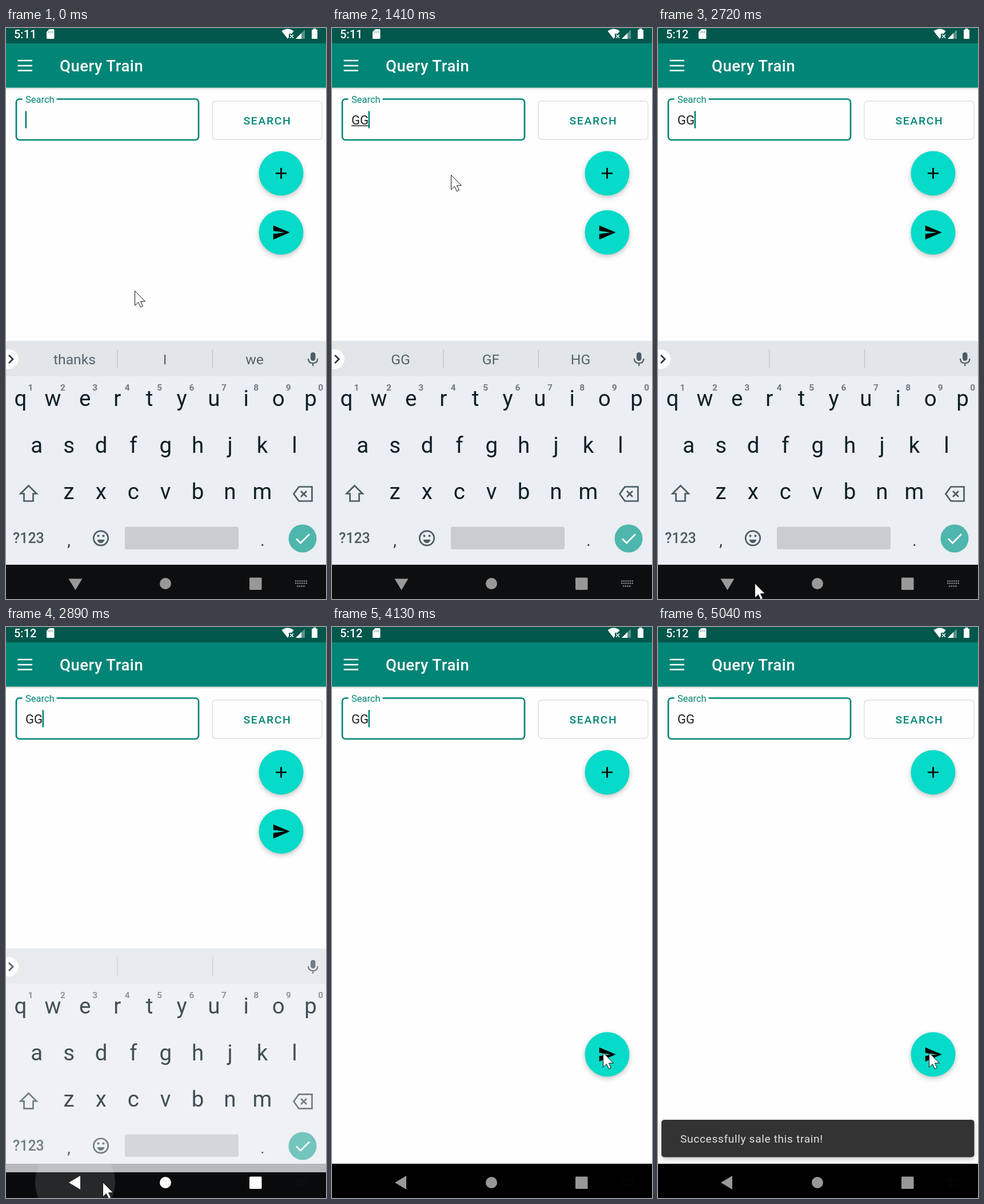
An HTML page that plays this animation: 560x1000 px, repeating every 5.1 s.

```html
<!DOCTYPE html>
<html lang="en">
<head>
<meta charset="utf-8">
<title>Train search</title>
<style>
html, body { margin: 0; width: 100%; height: 100%; overflow: hidden; background: #fefefe; }
svg { display: block; width: 100%; height: 100%; font-family: Roboto, sans-serif; }
.mid { text-anchor: middle; }
.med { font-weight: 500; }
.line { fill: none; stroke: #4a5c64; stroke-width: 2.7; }
.fab { filter: drop-shadow(0 3px 4px rgba(0,0,0,.24)); }
</style>
</head>
<body>
<svg viewBox="0 0 560 1000">
  <defs>
    <clipPath id="navClip"><rect y="940" width="560" height="60"/></clipPath>
    <linearGradient id="fade" x2="0" y2="1">
      <stop offset="0" stop-color="#000" stop-opacity=".16"/>
      <stop offset="1" stop-color="#000" stop-opacity="0"/>
    </linearGradient>
  </defs>
  <rect width="560" height="1000" fill="#fefefe"/>

  <!-- status bar and toolbar -->
  <rect y="104" width="560" height="5" fill="url(#fade)"/>
  <rect y="26" width="560" height="78.5" fill="#018577"/>
  <rect width="560" height="27" fill="#00574b"/>
  <g fill="#fff">
    <text id="clock" class="med" x="14" y="18" font-size="20"></text>
    <path d="M75.5 2H83q1.500 0 1.500 1.500V17.500q0 1.500-1.500 1.500H72.500q-1.500 0-1.500-1.500V7Z"/>
    <path d="M482.500 5.500Q493-2.500 503.500 5.500L500 10H495V16L493 19Z"/>
    <path d="M497 11.500l6 6m0-6l-6 6" stroke="#fff" stroke-width="1.600"/>
    <path d="M523 3V19H507Z" opacity=".35"/>
    <path d="M517 9V19H507Z"/>
    <path d="M535 3h2.500V1h5v2h2.500V19H535Z"/>
    <path d="M20.500 57h25.500m-25.500 9h25.500m-25.500 8.500h25.500" stroke="#fff" stroke-width="2.700"/>
    <text class="med" x="94" y="76" font-size="27.5" letter-spacing=".5">Query Train</text>
  </g>
  <path d="M75 5v4m3-4v4m3-4v4" stroke="#00574b" stroke-width="1" opacity=".6"/>

  <!-- search form -->
  <rect x="18" y="124.500" width="319" height="71.500" rx="5.500" fill="none" stroke="#018577" stroke-width="2.700"/>
  <rect x="28.500" y="121" width="60" height="8" fill="#fefefe"/>
  <text x="34" y="131" font-size="16.5" fill="#018577">Search</text>
  <text id="typed" x="34" y="169" font-size="22" fill="#212121"></text>
  <rect id="under" x="34" y="170.500" height="1.500" fill="#212121"/>
  <rect id="caret" y="145.500" width="2.700" height="30" fill="#018577"/>
  <rect x="361" y="128" width="192" height="67" rx="5.500" fill="#fefefe" stroke="#dfdfdf" stroke-width="1.400"/>
  <text class="med" x="415.500" y="168.700" font-size="19.25" letter-spacing="1.72" fill="#018577">SEARCH</text>

  <!-- action buttons -->
  <circle class="fab" cx="481.500" cy="254.500" r="39" fill="#06dac8"/>
  <path d="M472 254.500h19m-9.500-9.500v19" stroke="#000" stroke-width="2.700"/>
  <g id="send">
    <circle class="fab" r="39" fill="#06dac8"/>
    <circle id="tap" fill="#fff"/>
    <path transform="scale(1.375) translate(-12 -12)" d="M2 21L23 12 2 3V10L17 12 2 14Z"/>
  </g>

  <g id="snack">
    <rect class="fab" x="6" y="863" width="547.500" height="65.500" rx="5" fill="#333"/>
    <text x="39" y="903.300" font-size="19.25" letter-spacing=".6" fill="#e2e2e2">Successfully sale this train!</text>
  </g>

  <rect y="940" width="560" height="60"/>
  <g id="keyboard">
    <rect y="940" width="560" height="75" fill="#0c0e10"/>
    <rect y="548" width="560" height="392" fill="#ebeef2"/>
    <rect y="548" width="560" height="62" fill="#e2e6e9"/>
    <path d="M195 563v33m166.500-33v33" stroke="#c0c6c9" stroke-width="1.400"/>
    <path d="M0 563H5a17 17 0 0 1 0 34H0Z" fill="#fff"/>
    <path class="line" d="M5 573l7 7-7 7" style="stroke:#26363d"/>
    <rect x="533" y="568" width="8.500" height="15" rx="4.200" fill="#4a5c64"/>
    <path class="line" style="stroke-width:2.2" d="M529 579q0 8 8.200 8t8.200-8M537.200 587v5"/>
    <g id="hints" class="mid" font-size="24.75" fill="#54646c"></g>
    <g id="keys" class="mid" font-size="38.5" fill="#0d1f28"></g>
    <g id="digits" class="mid" font-size="15.5" font-weight="700" fill="#717d83"></g>
    <path class="line" d="M39.500 801.500L53.500 815.500H47.500V828.500H31.500V815.500H25.500Z"/>
    <path class="line" d="M512.500 803.500H535.500V828.500H512.500L503.500 816ZM516 811l10 10m0-10l-10 10"/>
    <text class="med" x="12" y="902" font-size="25" fill="#4a5c64">?123</text>
    <g class="mid" font-size="28" fill="#26363d"><text x="110" y="907">,</text><text x="449" y="907">.</text></g>
    <circle class="line" cx="166" cy="893.500" r="12.700"/>
    <path d="M159.500 896h13q-2 6-6.500 6t-6.500-6Z" fill="#4a5c64"/>
    <g fill="#4a5c64"><circle cx="161.500" cy="889.500" r="2"/><circle cx="170.500" cy="889.500" r="2"/></g>
    <rect x="208" y="873.500" width="199" height="39.500" rx="3.500" fill="#c9cdd0"/>
    <circle cx="519" cy="894" r="24.500" fill="#4eb6ac"/>
    <path d="M508 894.500l7.500 7.500 15.500-15.500" fill="none" stroke="#fff" stroke-width="2.800"/>
  </g>

  <!-- navigation bar -->
  <g clip-path="url(#navClip)"><circle id="ripple" cx="121" cy="972.500" fill="#fff"/></g>
  <g id="nav">
    <path id="back" d="M-11.500 0L8.500-12V12Z"/>
    <circle cx="279" cy="973" r="10"/>
    <rect x="426" y="962.500" width="21.500" height="21.500" rx="1.500"/>
  </g>
  <path id="imeIcon" d="M506 968.500h21m-21 4h21m-18 5h15" stroke="#989898" stroke-width="2.200" stroke-dasharray="2.4 1.3"/>

  <path id="cursor" d="M.5.5V26L6.500 20.500 10.500 29 14.500 27 10.500 18.800H18.500Z" fill="#fff" stroke="#111" stroke-width="1"/>
</svg>
<script>
const LOOP = 5100;
const $ = id => document.getElementById(id);
const set = (id, attrs) => { for (const k in attrs) $(id).setAttribute(k, attrs[k]); };
const ramp = (t, a, b) => Math.min(1, Math.max(0, (t - a) / (b - a)));
const easeOut = p => 1 - (1 - p) ** 2;

function addText(parent, text, x, y) {
  const el = document.createElementNS("http://www.w3.org/2000/svg", "text");
  el.setAttribute("x", x);
  el.setAttribute("y", y);
  el.textContent = text;
  $(parent).append(el);
  return el;
}
const row = (parent, chars, x, y) =>
  [...chars].forEach((c, i) => addText(parent, c, x + i * 56.4, y));

row("keys", "qwertyuiop", 25.5, 662);
row("keys", "asdfghjkl", 53.700, 744);
row("keys", "zxcvbnm", 110, 825);
row("digits", "1234567890", 43, 635);
const hints = [120, 278, 435].map(x => addText("hints", "", x, 589));

// Pointer tip: time, x, y
const path = [
  [20, 225, 460], [90, 205, 425], [170, 175, 365], [250, 160, 310], [340, 150, 245], [440, 148, 222],
  [1250, 148, 222], [1410, 207, 256], [1530, 335, 325], [1650, 428, 400], [1710, 435, 430],
  [1800, 418, 480], [1890, 375, 515], [1990, 322, 650], [2110, 276, 800], [2190, 238, 905],
  [2320, 205, 942], [2580, 169, 972], [2990, 169, 972], [3090, 270, 900], [3210, 430, 775], [3340, 474, 745]
];
function pointer(t) {
  const i = path.findIndex(p => p[0] > t);
  if (i === 0) return path[0].slice(1);
  if (i < 0) return path[path.length - 1].slice(1);
  const [t0, x0, y0] = path[i - 1], [t1, x1, y1] = path[i];
  const p = ramp(t, t0, t1);
  return [x0 + (x1 - x0) * p, y0 + (y1 - y0) * p];
}

// The caret starts visible and flips at each time
const flips = [180, 420, 1730, 2050, 2400, 2720, 3080, 3330, 3700, 4130, 4340, 4700, 5040];

function hintWords(t) {
  if (t < 780) return ["thanks", "I", "we"];
  if (t < 1180) return ["G", "Go", "Good"];
  return t < 2720 ? ["GG", "GF", "HG"] : ["", "", ""];
}

function draw(t) {
  const count = (t >= 740) + (t >= 1140);
  const width = count * 15;
  $("clock").textContent = t < 1530 ? "5:11" : "5:12";
  $("typed").textContent = "G".repeat(count);
  set("under", { width: t < 2720 ? width : 0 });
  set("caret", { x: 33.5 + width, opacity: flips.filter(f => f <= t).length % 2 ? 0 : 1 });
  hintWords(t).forEach((w, i) => { hints[i].textContent = w; });

  const hide = ramp(t, 2830, 2960) ** 2;
  set("keyboard", { transform: `translate(0 ${68 * hide})`, opacity: 1 - hide });

  set("send", { transform: `translate(481.5 ${t < 2960 ? 358 : 748.5})` });
  set("tap", { r: 39 * easeOut(ramp(t, 3550, 3720)), opacity: .22 * (1 - ramp(t, 3680, 3860)) });

  const press = ramp(t, 2720, 2810);
  set("ripple", { r: 70 * easeOut(press), opacity: .12 * (1 - ramp(t, 2910, 3150)) });
  const light = Math.round(152 + 103 * (press - ramp(t, 3860, 4130)));
  set("nav", { fill: `rgb(${light},${light},${light})` });
  const turn = easeOut(ramp(t, 2740, 2870));
  set("back", { transform: `translate(121.5 973) rotate(${-90 * (1 - turn)})` });
  set("imeIcon", { opacity: 1 - .95 * ramp(t, 2740, 2870) });

  const show = easeOut(ramp(t, 4320, 4420));
  const size = .8 + .2 * show;
  set("snack", { opacity: show, transform: `translate(279.5 896) scale(${size}) translate(-279.5 -896)` });

  set("cursor", { transform: `translate(${pointer(t).map(Math.round)})` });
}

const start = performance.now();
function tick() {
  draw((performance.now() - start) % LOOP);
  requestAnimationFrame(tick);
}
tick();
</script>
</body>
</html>
```
